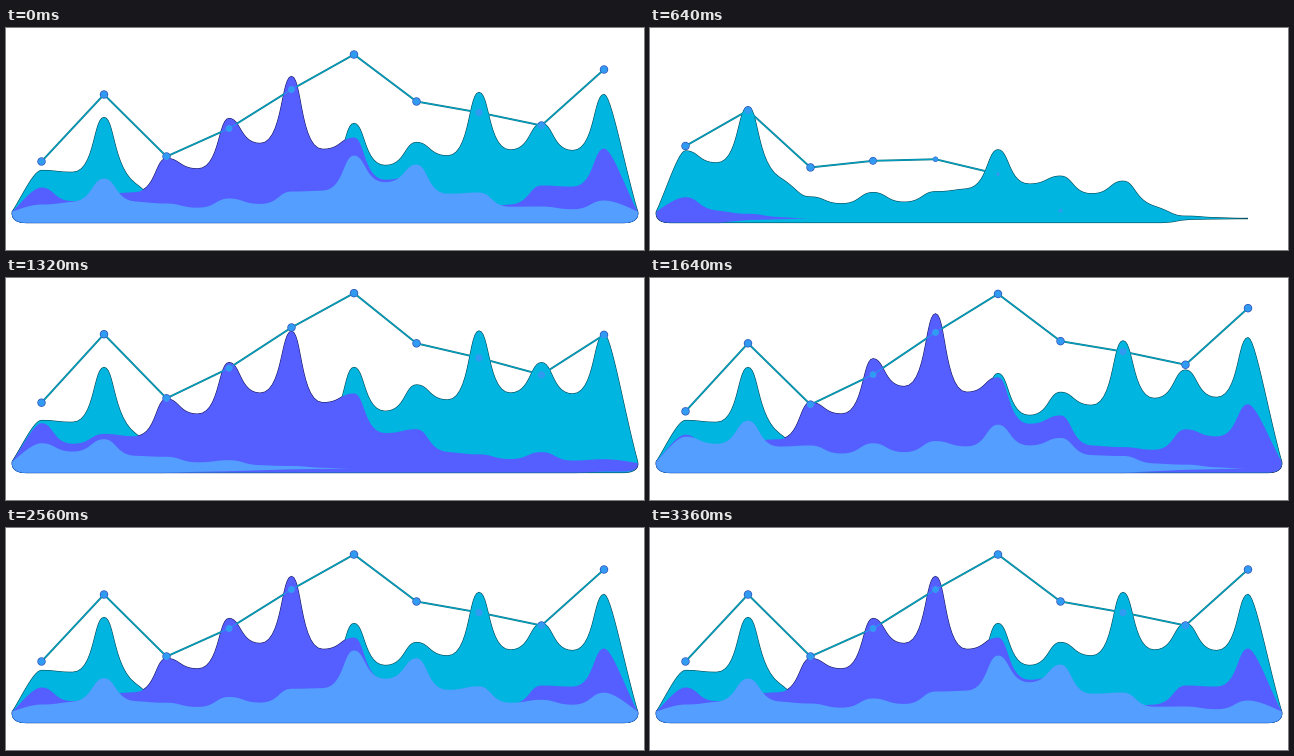
A matplotlib script for the animation above (4360 ms loop, 638 by 222 pixels).

```python
import numpy as np
import matplotlib.pyplot as plt
from matplotlib.animation import FuncAnimation
from matplotlib.patches import Polygon

W, H, DPI = 638, 222, 100
PX = 72 / DPI
STEP, LOOP, SETTLED = 40, 4360, 3360
BASE = 190.5
SAG = 0.62
COUNT = 10
IDX = np.arange(COUNT)
X = 35.5 + 62.5 * IDX


class Series:
    """Ten heights rising from left to right, each swinging past its goal."""

    def __init__(self, heights, delay, stagger, duration):
        self.heights = np.array(heights, float)
        self.starts = delay + stagger * IDX
        self.duration = duration
        self.push = (70 + 1.1 * self.heights) * (1 + 0.7 * np.exp(-2 * IDX))

    def progress(self, t):
        return np.clip((t - self.starts) / self.duration, 0, 1)

    def at(self, t):
        q = 1 - self.progress(t)
        return self.heights * (1 - q**3) + self.push * (q**2 - q**3)


teal = Series([48, 101, 12, 18, 22, 95, 76, 126, 95, 124], 10, 78, 1200)
violet = Series([31, 25, 60, 100, 142, 81, 44, 12, 33, 70], 520, 85, 1300)
sky = Series([14, 40, 15, 20, 27, 63, 54, 26, 12, 18], 1010, 72, 1560)
trend = Series([57, 124, 62, 90, 129, 164, 117, 106, 93, 149], 150, 78, 1530)


def bezier(p0, p1, p2, p3, n=14):
    u = np.linspace(0, 1, n)[:, None]
    p0, p1, p2, p3 = (np.array(p, float) for p in (p0, p1, p2, p3))
    return ((1 - u)**3 * p0 + 3 * u * (1 - u)**2 * p1
            + 3 * u**2 * (1 - u) * p2 + u**3 * p3)


def flank(x, h, xm, hm, slope):
    """Half a span, from a rounded crest to the sagging middle; low crests are wider."""
    d = xm - x
    soft = np.exp(-abs(h - hm) / 25)
    near, far = 0.32 + 0.15 * soft, 0.26 + 0.25 * soft
    return bezier((x, h), (x + near * d, h),
                  (x + far * d, hm - slope * (1 - far) * d), (xm, hm))


def crest(h, last):
    parts = []
    for i in range(last):
        a, b = h[i], h[i + 1]
        xm, hm = (X[i] + X[i + 1]) / 2, SAG * (a + b) / 2
        slope = np.sign(b - a) * max(0, hm - min(a, b)) / (xm - X[i])
        parts.append(flank(X[i], a, xm, hm, slope))
        parts.append(flank(X[i + 1], b, xm, hm, slope)[::-1])
    pts = np.vstack(parts)
    pts[:, 1] = BASE - pts[:, 1]
    return pts


def cap(x, h, edge):
    """Outer side of the area and its rounded foot, from top to bottom."""
    g = min(1, h / 12)
    y, foot, low = BASE - h, BASE - 7 * g, BASE + 4 * g
    d, s = edge - x, np.sign(edge - x)
    soft = 0.2 * np.exp(-h / 40)
    side = bezier((x, y), (x + (0.2 + soft) * d, y),
                  (x + (0.6 + soft) * d, y + 0.62 * (foot - y)), (edge, foot))
    corner = bezier((edge, foot), (edge + s, foot + 0.6 * (low - foot)),
                    (edge - 3 * s, low), (edge - 14 * s, low))
    return np.vstack([side, corner])


def outline(h):
    live = np.flatnonzero(h > 0.4)
    if not len(live):
        return None
    last = min(live[-1] + 1, COUNT - 1)
    parts = [cap(X[0], h[0], 6.5)[::-1], crest(h, last)]
    if h[-1] > 0.4:
        parts.append(cap(X[-1], h[-1], 631.5))
    bx = np.linspace(X[last], X[0], 60)
    depth = np.clip(np.interp(bx, X, h) / 12, 0, 1)
    parts.append(np.column_stack([bx, BASE + 4 * depth]))
    return np.vstack(parts)


fig = plt.figure(figsize=(W / DPI, H / DPI), dpi=DPI, facecolor="white")
ax = fig.add_axes([0, 0, 1, 1])
ax.set_xlim(0, W)
ax.set_ylim(H, 0)
ax.axis("off")

areas = []
for z, (series, fill, rim) in enumerate([(teal, "#00b5e0", "#064e5c"),
                                         (violet, "#555eff", "#1c1c66"),
                                         (sky, "#549eff", "#1f78d8")]):
    edge = Polygon([(0, 0), (1, 1), (2, 0)], fc=rim, ec=rim, lw=1.2 * PX, zorder=1 + z)
    body = Polygon([(0, 0), (1, 1), (2, 0)], fc=fill, ec="none", zorder=5 + z)
    ax.add_patch(edge)
    ax.add_patch(body)
    areas.append((series, (edge, body)))

# Dark rims lie under the areas so they only show against white.
line_rim, = ax.plot([], [], color="#067a8c", lw=1.9 * PX, zorder=4)
line, = ax.plot([], [], color="#00b5e0", lw=0.6 * PX, zorder=8)
dot_rim = ax.scatter(X, X, c="#2558b4", linewidths=0, zorder=4.5)
dot = ax.scatter(X, X, c="#2c9df0", edgecolors="#4193f8", linewidths=0.9 * PX, zorder=9)


def draw(frame):
    t = frame * STEP
    if frame == 0 or t >= SETTLED:
        t = LOOP
    for series, patches in areas:
        pts = outline(series.at(t))
        for p in patches:
            p.set_visible(pts is not None)
            if pts is not None:
                p.set_xy(pts)

    k = trend.progress(t)
    on = k > 0
    y = np.where(on, BASE - trend.at(t), np.nan)
    for item in (line_rim, line):
        item.set_data(X, y)
    size = np.clip(k / 0.18, 0.4, 1)
    for item, width in ((dot_rim, 8.4), (dot, 6)):
        item.set_offsets(np.column_stack([X[on], y[on]]))
        item.set_sizes((width * PX * size[on])**2)
    return []


anim = FuncAnimation(fig, draw, frames=LOOP // STEP, interval=STEP,
                     repeat=True, repeat_delay=0, blit=False)
plt.show()
```
